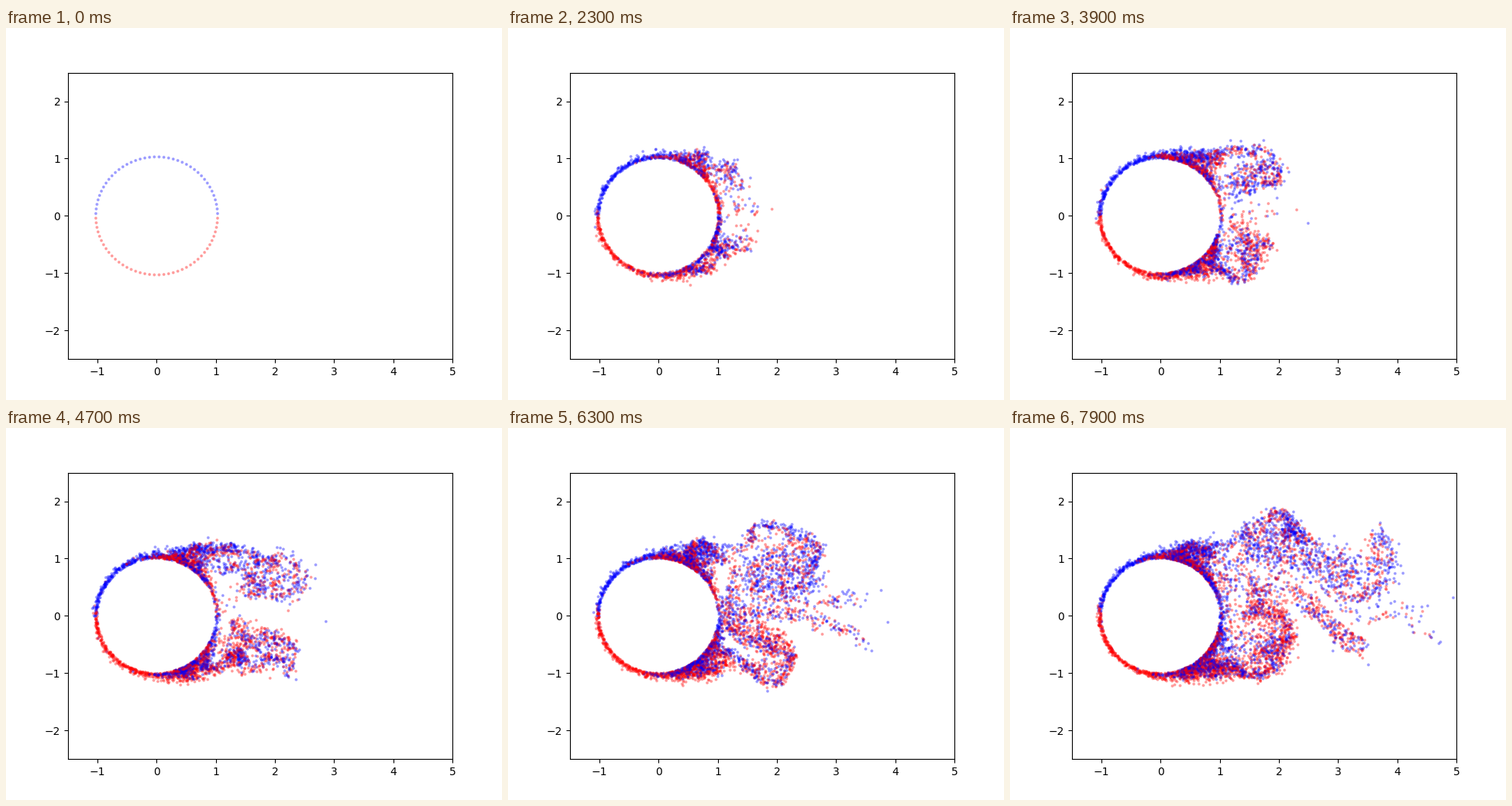
These frames come from a looping animation (640x480 px, 8000 ms). A matplotlib script:

```python
"""Random vortex method: impulsively started flow past a unit cylinder."""
import numpy as np
import matplotlib.pyplot as plt
from matplotlib.animation import FuncAnimation

FRAMES, INTERVAL = 80, 100
PANELS = 80               # vortices shed per step
DT, NU = 0.1, 0.0015
SHED_R = 1.03
CUTOFF = 20               # angular mode where the vortex cores fade out

# Log-polar grid: s = ln r, square cells, three columns per panel
NT, NS = 3 * PANELS, 76
H = 2 * np.pi / NT
S = np.arange(NS) * H
R = np.exp(S)[:, None]
T = (np.arange(NT) + 0.5) * H

# Green's function of each angular mode, with psi = 0 on the cylinder
K = np.arange(NT // 2 + 1)
k = np.maximum(K, 1)[:, None, None]
gap, total = abs(S[:, None] - S), S[:, None] + S
GREEN = H * (np.exp(-k * gap) - np.exp(-k * total)) / (2 * k)
GREEN[0] = H * np.minimum(S[:, None], S)
WALL = H * np.exp(-K[:, None] * S)
CORE = np.exp(-(K / CUTOFF) ** 2)


def corners(s, th):
    """Flat index and bilinear weight of the four nodes around each point."""
    u = np.clip(s / H, 0, NS - 1.001)
    v = th / H - 0.5
    i, j = np.floor(u).astype(int), np.floor(v).astype(int)
    a, b = u - i, v - j
    return [((i + di) * NT + (j + dj) % NT, abs(1 - di - a) * abs(1 - dj - b))
            for di in (0, 1) for dj in (0, 1)]


def stream_slopes(s, th, gamma):
    """Grid values of d(psi)/d(theta) and d(psi)/ds for the whole flow."""
    rhs = sum(np.bincount(n, w * gamma, NS * NT) for n, w in corners(s, th))
    f = np.fft.rfft(rhs.reshape(NS, NT) / H**2, axis=1) * CORE
    f = np.ascontiguousarray(f.T)
    parts = f.view(float).reshape(*f.shape, 2)
    modes = (GREEN @ parts).view(complex)[..., 0]
    psi = np.fft.irfft(modes.T, NT, axis=1)
    d_th = np.fft.irfft((1j * K[:, None] * modes).T, NT, axis=1)
    d_s = np.gradient(psi, H, axis=0)
    d_s[0] = np.fft.irfft((WALL * f).sum(axis=1), NT)
    return d_th + (R - 1 / R) * np.cos(T), d_s + (R + 1 / R) * np.sin(T)


def velocity(s, th, gamma):
    d_th, d_s = stream_slopes(s, th, gamma)
    near = corners(s, th)
    a, b = (sum(g.ravel()[n] * w for n, w in near) for g in (d_th, d_s))
    r2 = np.exp(2 * s)
    return a / r2, -b / r2


def simulate():
    rng = np.random.default_rng(4)
    panel = (np.arange(PANELS) + 0.5) * 2 * np.pi / PANELS
    s, th, gamma = np.zeros((3, 0))
    path = []
    for _ in range(FRAMES):
        # New vortices cancel the slip on the wall
        slip = -stream_slopes(s, th, gamma)[1][0]
        s = np.append(s, np.full(PANELS, np.log(SHED_R)))
        th = np.append(th, panel)
        gamma = np.append(gamma, slip.reshape(PANELS, 3).mean(axis=1)
                          * 2 * np.pi / PANELS)
        path.append(np.column_stack([np.cos(th), np.sin(th)])
                    * np.exp(s)[:, None])

        # Midpoint step, random walk, reflection off the wall
        vs, vt = velocity(s, th, gamma)
        vs, vt = velocity(np.abs(s + vs * DT / 2), th + vt * DT / 2, gamma)
        walk = rng.normal(0, np.sqrt(2 * NU * DT), (2, s.size)) / np.exp(s)
        s = np.clip(np.abs(s + vs * DT + walk[0]), 0, S[-1])
        th = (th + vt * DT + walk[1]) % (2 * np.pi)
    return path, gamma


path, gamma = simulate()
colors = np.where(gamma[:, None] < 0, [0, 0, 1, 0.27], [1, 0, 0, 0.27])

fig, ax = plt.subplots(figsize=(6.4, 4.8), dpi=100)
dots = ax.scatter([], [], s=3.5, linewidths=1)
ax.set_xlim(-1.5, 5)
ax.set_ylim(-2.5, 2.5)


def draw(i):
    dots.set_offsets(path[i])
    shade = colors[:len(path[i])]
    dots.set_facecolor(shade)
    dots.set_edgecolor(shade)
    return dots,


anim = FuncAnimation(fig, draw, frames=FRAMES, interval=INTERVAL,
                     init_func=lambda: draw(0), repeat=True)
plt.show()
```
